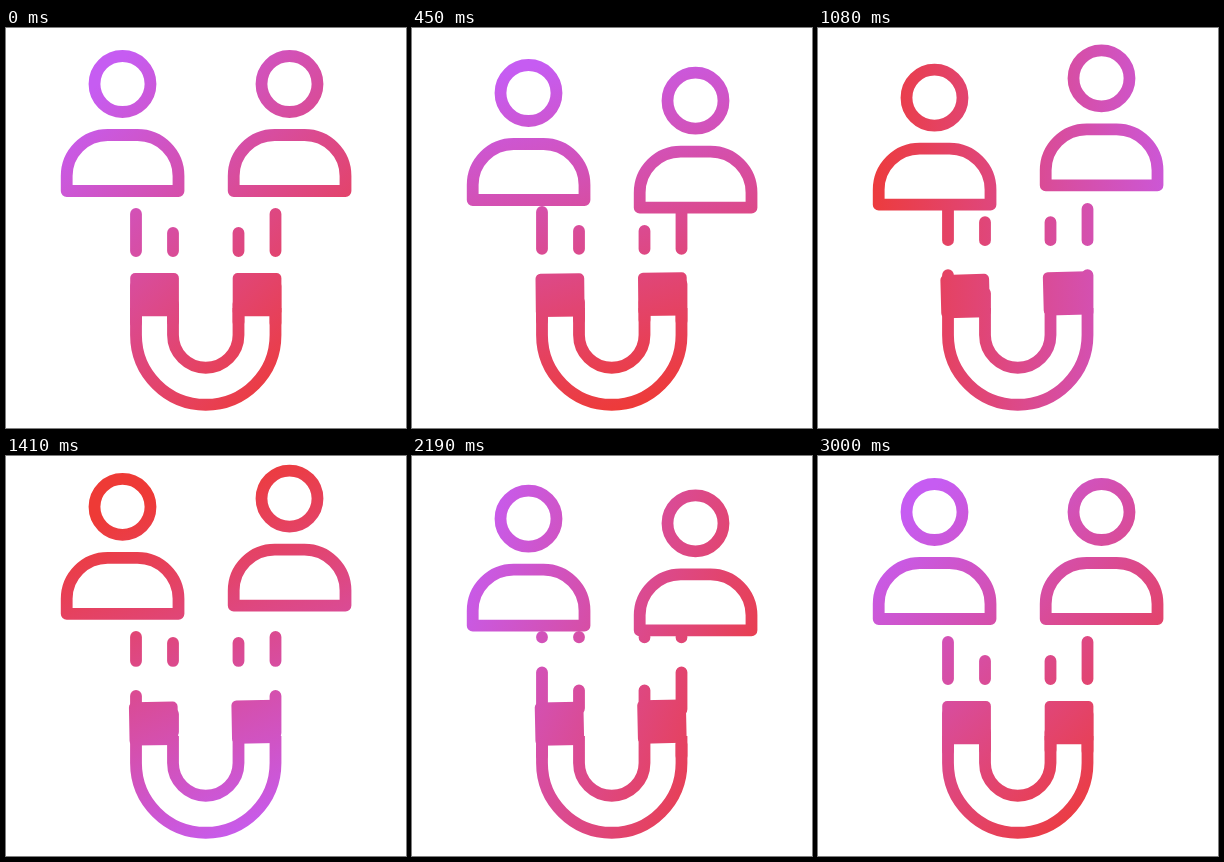
Write an HTML page that moves like this. It is 400 by 400 pixels and loops after 3.03 s.

```html
<!DOCTYPE html>
<html lang="en">
<head>
<meta charset="utf-8">
<title>Magnet attracting people</title>
<style>
  html, body { margin: 0; width: 100%; height: 100%; overflow: hidden; background: #fff; }
  svg { display: block; width: 100%; height: 100%; }
</style>
</head>
<body>
<svg viewBox="0 0 400 400">
  <defs>
    <linearGradient id="paint" gradientUnits="userSpaceOnUse">
      <stop offset="0" stop-color="#c65cf2"/>
      <stop offset="1" stop-color="#ee3a36"/>
    </linearGradient>
    <g id="person">
      <circle cx="116.5" cy="56" r="28"/>
      <path d="M60.7 163V148A41 41 0 0 1 101.7 107H131.5A41 41 0 0 1 172.5 148V163Z"/>
    </g>
    <!-- One mask for all shapes, so the gradient stays fixed to the stage -->
    <mask id="art" maskUnits="userSpaceOnUse" x="0" y="0" width="400" height="400">
      <g fill="none" stroke="#fff" stroke-width="11.8" stroke-linejoin="round">
        <use id="left" href="#person"/>
        <use id="right" href="#person"/>
        <path d="M130 280V307A69.75 69.75 0 0 0 269.5 307V280M167 280V307A32.75 32.75 0 0 0 232.5 307V280"/>
        <g stroke-linecap="round">
          <path id="outer" d="M130 181V300M269.5 181V300" stroke-dasharray="37 35"/>
          <path id="inner" d="M167 181V300M232.5 181V300" stroke-dasharray="18 53"/>
        </g>
        <g id="pads" fill="#fff" stroke="none">
          <rect x="124.2" y="245" width="48.7" height="43.3" rx="5"/>
          <rect x="226.7" y="245" width="48.7" height="43.3" rx="5"/>
        </g>
      </g>
    </mask>
  </defs>
  <rect width="400" height="400" fill="url(#paint)" mask="url(#art)"/>
</svg>
<script>
const LOOP = 3030, STEP = 30;
const el = id => document.getElementById(id);
const set = (id, attrs) => {
  for (const key in attrs) el(id).setAttribute(key, attrs[key]);
};
const smooth = x => x * x * (3 - 2 * x);

// Keys are [time, value] pairs, eased in and out between neighbours.
function track(keys, t) {
  const i = keys.findIndex(key => key[0] > t);
  if (i < 0) return keys[keys.length - 1][1];
  const [t0, a] = keys[i - 1], [t1, b] = keys[i];
  return a + (b - a) * smooth((t - t0) / (t1 - t0));
}

const leftBob = [[0, 0], [900, 18], [1680, -14], [2400, 12], [3000, 0]];
const rightBob = [[0, 0], [540, 18], [1350, -14], [2050, 12], [3000, 0]];
const padTilt = [[0, 0], [1080, -1.5], [1740, -0.6], [2190, -1.2], [2700, 1.2], [3000, 0]];

// Field lines creep upwards, then fall back.
function lift(t) {
  const peak = 2200, height = 42;
  return t < peak
    ? height * (t / peak) ** 1.9
    : height * Math.max(0, (3000 - t) / (3000 - peak)) ** 2;
}

function draw(t) {
  const turn = 2 * Math.PI * smooth(Math.min(1, t / 2600));
  const angle = Math.PI / 4 + turn;
  const dx = 180 * Math.cos(angle), dy = 180 * Math.sin(angle);
  const cx = 200 + 12 * (1 - Math.cos(turn)), cy = 202;
  set("paint", { x1: cx - dx, y1: cy - dy, x2: cx + dx, y2: cy + dy });

  set("left", { y: track(leftBob, t) });
  set("right", { x: 167, y: track(rightBob, t) });
  set("pads", { transform: `rotate(${track(padTilt, t)} 200 320)` });

  const rise = lift(t);
  set("outer", { "stroke-dashoffset": rise - 5 });
  set("inner", { "stroke-dashoffset": rise - 24 });
}

const start = performance.now();
function tick() {
  const t = (performance.now() - start) % LOOP;
  draw(Math.floor(t / STEP) * STEP);
  requestAnimationFrame(tick);
}
tick();
</script>
</body>
</html>
```
